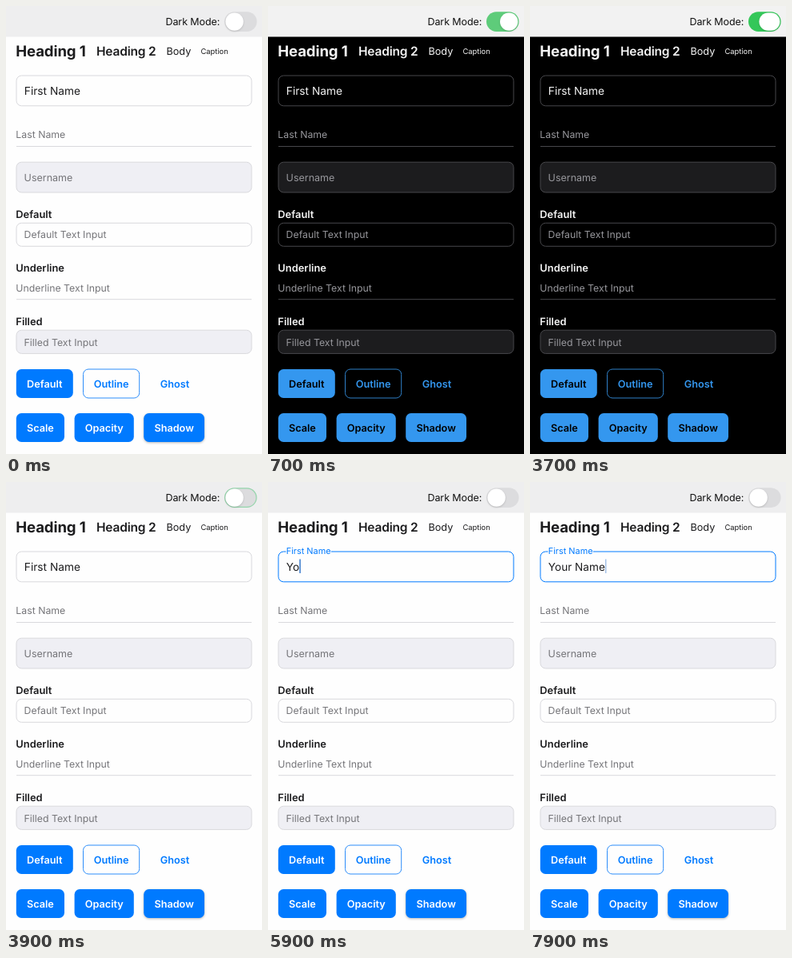
Recreate the animation shown at these times as an HTML page. Size 320 by 560 pixels, loop 8000 ms.

```html
<!DOCTYPE html>
<html lang="en">
<head>
<meta charset="utf-8">
<title>Form theme demo</title>
<style>
html, body { margin: 0; width: 100%; height: 100%; overflow: hidden; }
svg {
  display: block; width: 320px; height: 560px;
  font-family: Inter, Roboto, sans-serif; text-rendering: geometricPrecision;
  --bg: #fefefe; --bar: #eeeeef; --ink: #1c1c1e; --hint: #757579;
  --line: #d9d9dd; --fill: #efeff4; --main: #007aff; --onmain: #fff;
  --edge: #2d8dfa;
}
svg.dark {
  --bg: #000; --bar: #f2f2f2; --ink: #f4f4f4; --hint: #97979c;
  --line: #47474b; --fill: #1c1c1e; --main: #3497ef; --onmain: #000;
  --edge: #2f80c8;
}
text { fill: var(--ink); font-size: 12.3px; white-space: pre; }
.hint { fill: var(--hint); }
.label { font-size: 12.9px; font-weight: 600; }
.box { fill: none; stroke: var(--line); }
.filled { fill: var(--fill); }
.btn { fill: var(--main); }
.btn.outline { fill: none; stroke: var(--edge); }
.btn.ghost { fill: none; }
.btn.shadow { filter: drop-shadow(0 1.5px 1.5px rgba(0, 0, 0, .28)); }
.cap { font-size: 12.7px; font-weight: 600; text-anchor: middle; fill: var(--onmain); }
.outline + .cap, .ghost + .cap { fill: var(--main); }
</style>
</head>
<body>
<svg id="stage" viewBox="0 0 320 560" xmlns="http://www.w3.org/2000/svg">
  <rect width="320" height="560" fill="var(--bg)"/>
  <rect width="320" height="38.5" fill="var(--bar)"/>
  <text x="267.3" y="24.3" text-anchor="end" style="font-size:12.5px;letter-spacing:-.08px;fill:#111">Dark Mode:</text>
  <rect id="track" x="273" y="7.2" width="40.6" height="24.8" rx="12.4"/>
  <rect id="ring" x="273.6" y="7.8" width="39.4" height="23.6" rx="11.8" fill="none" stroke="#4fd07a" stroke-width="1.2"/>
  <rect id="thumb" y="8.4" height="22.4" rx="11.2" fill="#fff" style="filter:drop-shadow(0 1px 1px rgba(0,0,0,.16))"/>

  <text x="12.2" y="63.2" style="font-size:18.6px;font-weight:700;letter-spacing:-.1px">Heading 1</text>
  <text x="113" y="62.3" style="font-size:15.5px;font-weight:600;letter-spacing:-.2px">Heading 2</text>
  <text x="200.4" y="61" style="font-size:12.7px">Body</text>
  <text x="243.4" y="59.9" style="font-size:9.4px">Caption</text>

  <rect id="border" class="box" x="13" y="87" width="294" height="37.8" rx="6.5"/>
  <rect id="gap" x="22.5" height="14" fill="var(--bg)"/>
  <text id="name" x="22.8">First Name</text>
  <text id="typed" x="22.8" y="111" style="font-size:13.6px"></text>
  <rect id="caret" y="96.5" width="1.4" height="17.5" fill="#2a70c8"/>

  <text class="hint" x="12.3" y="164.5">Last Name</text>
  <path class="box" d="M13 175.5H307"/>
  <rect class="box filled" x="13" y="195.2" width="294" height="37.8" rx="6.5"/>
  <text class="hint" x="22.6" y="219" style="font-size:12.5px">Username</text>

  <text class="label" x="12.3" y="264.7">Default</text>
  <rect class="box" x="13" y="271.3" width="294" height="29" rx="6.5"/>
  <text class="hint" x="22.6" y="290.4">Default Text Input</text>
  <text class="label" x="12.3" y="332">Underline</text>
  <text class="hint" x="12.3" y="357">Underline Text Input</text>
  <path class="box" d="M13 366.7H307"/>
  <text class="label" x="12.3" y="398.7">Filled</text>
  <rect class="box filled" x="13" y="405.2" width="294" height="29.2" rx="6.5"/>
  <text class="hint" x="22.6" y="424.5">Filled Text Input</text>
  <g id="buttons"></g>
</svg>
<script>
const LOOP = 8000, STEP = 200;
const $ = id => document.getElementById(id);
const set = (id, attrs) => {
  for (const k in attrs) $(id).setAttribute(k, attrs[k]);
};
const lerp = (a, b, p) => a + (b - a) * p;
const ramp = (t, a, b) => Math.min(1, Math.max(0, (t - a) / (b - a)));
const mix = (a, b, p) => `rgb(${a.map((v, i) => Math.round(lerp(v, b[i], p)))})`;

const GREY = [220, 220, 222], GREEN = [52, 199, 89], BLUE = [0, 122, 255];
const HINT = [117, 117, 121], LINE = [217, 217, 221];

// label, style, x, y, width
const buttons = [
  ['Default', '', 12.8, 454, 71], ['Outline', 'outline', 96.5, 454, 70.2],
  ['Ghost', 'ghost', 180, 454, 62], ['Scale', '', 12.8, 509, 60.2],
  ['Opacity', '', 85.6, 509, 74.2], ['Shadow', 'shadow', 172.2, 509, 75.8]
];
$('buttons').innerHTML = buttons.map(([label, style, x, y, w]) => `
  <rect class="btn ${style}" x="${x}" y="${y}" width="${w}" height="36" rx="6.5"/>
  <text class="cap" x="${x + w / 2}" y="${y + 22.5}">${label}</text>`).join('');

// moments at which each character of the phrase appears
const PHRASE = 'Your Name';
const KEYS = [5700, 5900, 6100, 6300, 6500, 6700, 6900, 7100, 7500];

function drawToggle(t) {
  const dark = t >= 700 && t < 3900;
  const pressed = (t >= 500 && t < 700) || (t >= 3700 && t < 3900);
  const width = pressed ? 26 : 22.4;
  const on = t < 3900 ? ramp(t, 550, 750) : 0;
  $('stage').classList.toggle('dark', dark);
  set('track', { fill: mix(GREY, GREEN, on) });
  set('ring', { opacity: t < 3900 ? 0 : 1 - ramp(t, 3800, 4000) });
  set('thumb', { x: dark ? 312.4 - width : 274.4, width });
}

function drawField(t) {
  const p = ramp(t, 5040, 5240);
  const size = lerp(13.7, 10.9, p), y = lerp(111, 90, p);
  const focused = p > 0;
  $('name').style.fontSize = size + 'px';
  $('name').style.fill = focused ? mix(HINT, BLUE, p) : '';
  set('name', { y });
  $('border').style.stroke = focused ? mix(LINE, BLUE, p) : '';
  const label = $('name').getComputedTextLength();
  set('gap', { y: y - 11 - 7 * (1 - p), width: label + 0.6, height: lerp(20, 14, p), opacity: focused ? 1 : 0 });

  const text = PHRASE.slice(0, KEYS.filter(k => t >= k).length);
  $('typed').textContent = text;
  const end = text ? $('typed').getComputedTextLength() : 0;
  set('caret', { x: 23 + end, opacity: focused ? 1 - ramp(t, 7700, 8060) : 0 });
}

function draw(t) {
  const s = Math.max(0, Math.floor((t + 100) / STEP) * STEP - 100);
  drawToggle(s);
  drawField(s);
}

const start = performance.now();
function tick(now) {
  draw(Math.max(0, now - start) % LOOP);
  requestAnimationFrame(tick);
}
draw(0);
requestAnimationFrame(tick);
</script>
</body>
</html>
```
